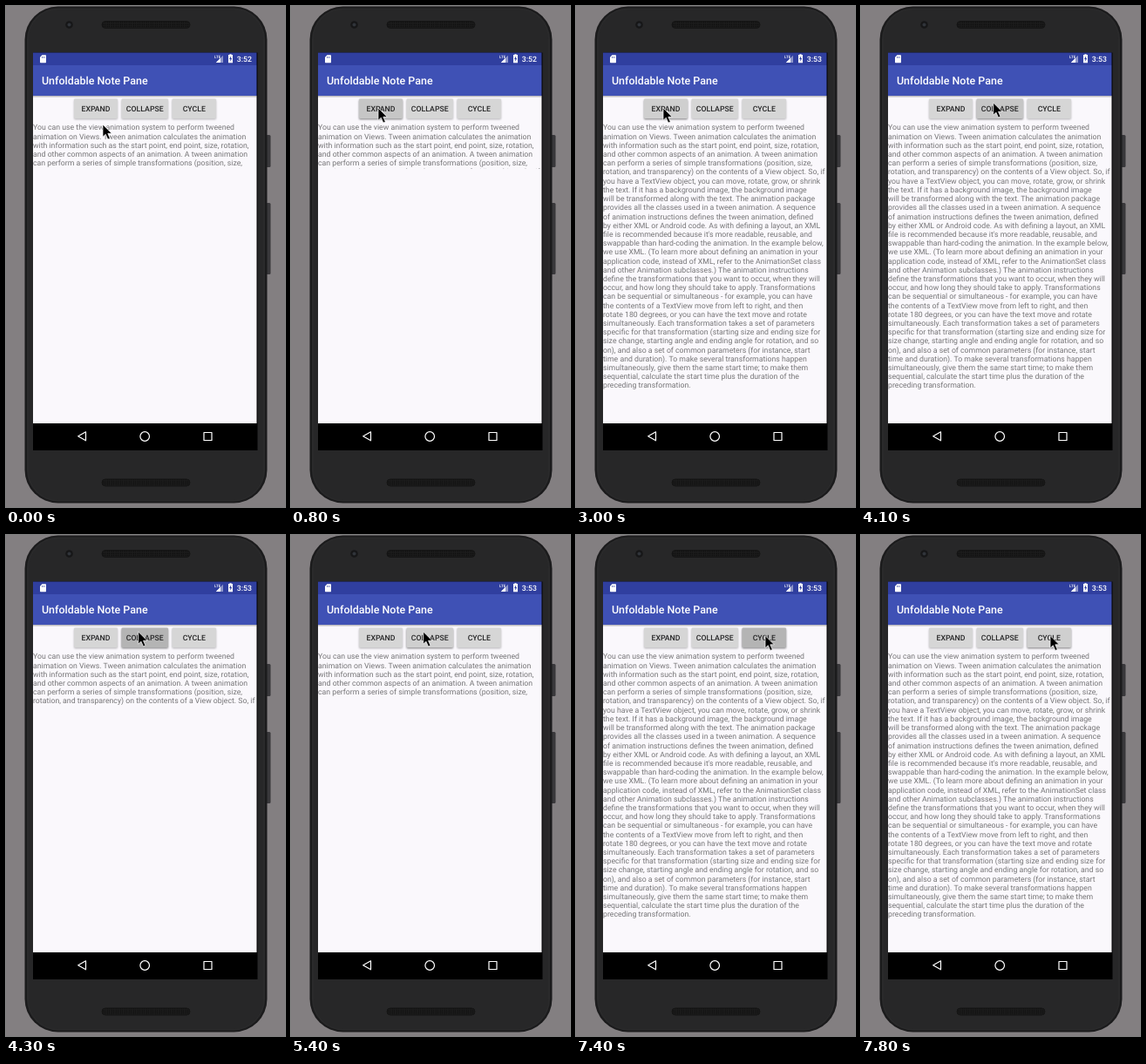
These frames come from a looping animation (320x575 px, 8000 ms). An HTML page:

```html
<!DOCTYPE html>
<html lang="en">
<head>
<meta charset="utf-8">
<title>Expanding text demo</title>
<style>
  html, body { margin: 0; width: 100%; height: 100%; overflow: hidden; background: #837f81; }
  svg { display: block; width: 100%; height: 100%; }
  text { font-family: Roboto, sans-serif; font-size: 8.72px; text-rendering: geometricPrecision; }
  .medium { font-weight: 500; }
</style>
</head>
<body>
<svg viewBox="0 0 320 575">
  <defs>
    <linearGradient id="shade" x2="0" y2="1">
      <stop offset="0" stop-color="#000" stop-opacity=".3"/>
      <stop offset="1" stop-color="#000" stop-opacity="0"/>
    </linearGradient>
    <pattern id="mesh" width="2.5" height="2.5" patternUnits="userSpaceOnUse">
      <rect width="2.5" height="2.5" fill="#1c1c1c"/>
      <circle cx="1.2" cy="1.2" r=".7" fill="#090909"/>
    </pattern>
    <filter id="blur" x="-20%" y="-40%" width="140%" height="180%"><feGaussianBlur stdDeviation="1.1"/></filter>
    <clipPath id="reveal"><rect id="window" x="30" y="134" width="258" height="52"/></clipPath>
  </defs>

  <!-- Phone -->
  <g fill="#39383b">
    <rect x="298" y="148" width="5.5" height="37" rx="1.5"/>
    <rect x="298" y="226" width="5.5" height="82" rx="1.5"/>
  </g>
  <rect x="21.5" y=".5" width="278" height="570" rx="38" fill="#1b1b1c"/>
  <rect x="24" y="2.5" width="273" height="566" rx="36" fill="#2a2a2b"/>
  <rect x="26" y="4" width="269" height="563" rx="34" fill="#272728"/>
  <g fill="url(#mesh)" stroke="#151515">
    <rect x="110" y="17.5" width="101" height="8" rx="4"/>
    <rect x="110" y="543" width="101" height="8" rx="4"/>
  </g>
  <circle cx="72.5" cy="21.5" r="4.3" fill="#171718"/>
  <circle cx="72.5" cy="21.5" r="2" fill="#30343a"/>

  <!-- Screen -->
  <rect x="31" y="53.5" width="257.5" height="456.5"/>
  <rect x="31" y="103" width="256.5" height="376" fill="#faf8fc"/>
  <rect x="31" y="53.5" width="256.5" height="14.5" fill="#303f9f"/>
  <rect x="31" y="68" width="256.5" height="35" fill="#3f51b5"/>
  <rect x="31" y="103" width="256.5" height="2.5" fill="url(#shade)"/>
  <text class="medium" x="41" y="90.4" fill="#fff" style="font-size:12.46px">Unfoldable Note Pane</text>

  <!-- Status icons -->
  <g fill="#fff">
    <path d="M41.5 56.2H45.3Q46 56.2 46 57V64.4Q46 65.2 45.3 65.2H39.7Q39 65.2 39 64.4V58.7Z"/>
    <path d="M249 56.8V65H240.8Z" fill-opacity=".45"/>
    <path d="M246 59.8V65H240.8Z"/>
    <text class="medium" x="239" y="60.1" style="font-size:4.5px">LTE</text>
    <path d="M256.4 56V55.2H258.6V56H260V65.2H255V56Z"/>
    <path d="M258 57.5L256.1 61H257.3V63.7L259.1 60H258Z" fill="#303f9f"/>
    <text id="clock" class="medium" x="264.7" y="63.8"></text>
  </g>
  <path d="M41.4 58.2V59.7M42.8 58.2V59.7M44.2 58.2V59.7" stroke="#303f9f" stroke-width=".7"/>

  <!-- Navigation bar -->
  <g fill="none" stroke="#fff" stroke-width="1.2" stroke-linejoin="round">
    <path d="M82.7 493.8L91.5 488.8V498.8Z"/>
    <circle cx="159.2" cy="494" r="5.3"/>
    <rect x="227" y="489.5" width="9" height="9"/>
  </g>

  <g id="buttons"></g>
  <g id="copy" fill="#767577" clip-path="url(#reveal)"></g>
  <path id="cursor" d="M0 0V14.2L3.3 11.2L5.8 17L8.3 15.9L5.8 10.3H10.3Z" stroke="#fff" stroke-width=".7"/>
</svg>
<script>
const LOOP = 8000, STEP = 100;
const $ = id => document.getElementById(id);

function add(parent, tag, attributes, content = '') {
  const node = document.createElementNS('http://www.w3.org/2000/svg', tag);
  for (const name in attributes) node.setAttribute(name, attributes[name]);
  node.textContent = content;
  return parent.appendChild(node);
}

const lines = `You can use the view animation system to perform tweened
animation on Views. Tween animation calculates the animation
with information such as the start point, end point, size, rotation,
and other common aspects of an animation. A tween animation
can perform a series of simple transformations (position, size,
rotation, and transparency) on the contents of a View object. So, if
you have a TextView object, you can move, rotate, grow, or shrink
the text. If it has a background image, the background image
will be transformed along with the text. The animation package
provides all the classes used in a tween animation. A sequence
of animation instructions defines the tween animation, defined
by either XML or Android code. As with defining a layout, an XML
file is recommended because it's more readable, reusable, and
swappable than hard-coding the animation. In the example below,
we use XML. (To learn more about defining an animation in your
application code, instead of XML, refer to the AnimationSet class
and other Animation subclasses.) The animation instructions
define the transformations that you want to occur, when they will
occur, and how long they should take to apply. Transformations
can be sequential or simultaneous - for example, you can have
the contents of a TextView move from left to right, and then
rotate 180 degrees, or you can have the text move and rotate
simultaneously. Each transformation takes a set of parameters
specific for that transformation (starting size and ending size for
size change, starting angle and ending angle for rotation, and so
on), and also a set of common parameters (for instance, start
time and duration). To make several transformations happen
simultaneously, give them the same start time; to make them
sequential, calculate the start time plus the duration of the
preceding transformation.`.split('\n');
const LINE_HEIGHT = 10.21;
lines.forEach((line, i) => add($('copy'), 'text', { x: 31, y: 142.4 + i * LINE_HEIGHT }, line));

// presses: start times of each press; raised: interval with a deeper shadow
const buttons = [
  { label: 'EXPAND', x: 78, width: 50, presses: [800, 2000], raised: [800, 3200] },
  { label: 'COLLAPSE', x: 132.5, width: 53.5, presses: [4100], raised: [4000, 5600] },
  { label: 'CYCLE', x: 190.5, width: 50.5, presses: [7200], raised: [7200, LOOP] },
];
for (const button of buttons) {
  const { label, x, width } = button;
  const box = { x, width, height: 22.5, rx: 1.2 };
  button.shadow = add($('buttons'), 'rect', { ...box, y: 107.8, filter: 'url(#blur)' });
  button.face = add($('buttons'), 'rect', { ...box, y: 106.5 });
  add($('buttons'), 'text', { class: 'medium', x: x + width / 2, y: 121, 'text-anchor': 'middle', fill: '#242425' }, label);
}

const clamp = v => Math.min(1, Math.max(0, v));
const ease = v => (1 - Math.cos(Math.PI * clamp(v))) / 2;

// Each move eases the pointer from its previous place: [start, end, x, y]
const moves = [
  [0, 0, 111, 136],
  [50, 300, 100, 117],
  [3050, 3600, 150, 110.5],
  [3700, 3800, 151.7, 111],
  [6460, 7000, 217, 115.5],
];

function pointerAt(t) {
  let x = 0, y = 0;
  for (const [start, end, toX, toY] of moves) {
    const k = end > start ? 1 - (1 - clamp((t - start) / (end - start))) ** 3 : 1;
    x += (toX - x) * k;
    y += (toY - y) * k;
  }
  return [x, y];
}

function pressAt(t, start) {
  return clamp((t - start + 50) / 150) * clamp((start + 450 - t) / 200);
}

function render(t) {
  const open = ease((t - 790) / 200) - ease((t - 4127) / 200) + ease((t - 7190) / 200);
  $('window').setAttribute('height', LINE_HEIGHT * (5 + 25 * open) + .5);
  $('clock').textContent = t < 2200 ? '3:52' : '3:53';
  $('cursor').setAttribute('transform', `translate(${pointerAt(t)})`);
  for (const { presses, raised, face, shadow } of buttons) {
    const press = Math.max(...presses.map(start => pressAt(t, start)));
    const lifted = t >= raised[0] && t < raised[1];
    const grey = (lifted ? 207 : 214) - 27 * press;
    face.setAttribute('fill', `rgb(${grey},${grey},${grey})`);
    shadow.setAttribute('opacity', lifted ? .45 : .25);
  }
}

function tick() {
  render(Math.floor(performance.now() % LOOP / STEP) * STEP);
  requestAnimationFrame(tick);
}
tick();
</script>
</body>
</html>
```
